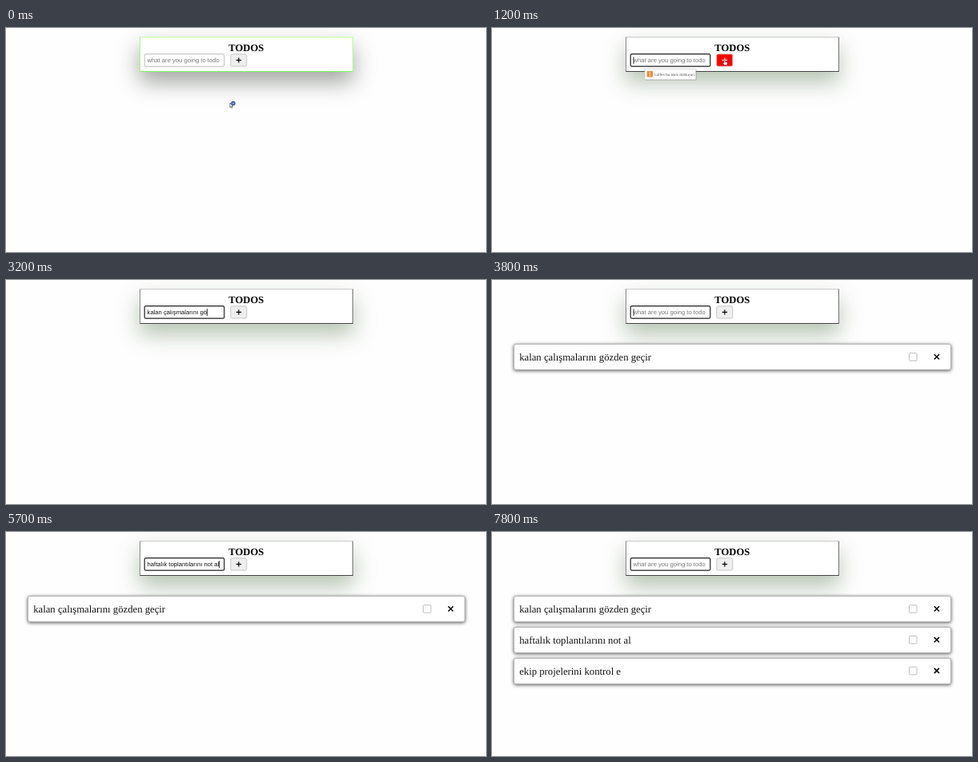
An HTML page for the animation above (8 s loop, 600x281 px).

```html
<!DOCTYPE html>
<html lang="tr">
<head>
<meta charset="utf-8">
<title>Todos</title>
<style>
html, body { margin: 0; width: 100%; height: 100%; overflow: hidden; background: #fefefe; }
.stage { position: absolute; left: 0; top: 0; width: 600px; height: 281px; overflow: hidden; }
svg { position: absolute; left: 0; top: 0; }
.panel, .item { position: absolute; box-sizing: border-box; background: #fff; }
.panel {
  left: 167px; top: 11px; width: 267px; height: 44px;
  border: 1px solid; animation: calm 8s linear infinite;
}
.item {
  left: 27px; width: 547px; height: 33px; border-radius: 3px;
  border: 1px solid #b4b4b4;
  box-shadow: 0 1px 4px rgba(0, 0, 0, .65);
}
text { white-space: pre; text-rendering: geometricPrecision; }
.title, .label { font-family: "Liberation Serif", "Times New Roman", serif; }
.title { font-size: 12.6px; font-weight: bold; }
.label { font-size: 12.72px; fill: #111; }
.field { font: 7.65px "Liberation Sans", Arial, sans-serif; }
.bubble text { font: 4.3px "Open Sans", "Noto Sans", sans-serif; }
.add rect { animation: hover 8s step-end infinite; }
.add path { animation: plus 8s step-end infinite; }
.bubble { animation: bubble 8s step-end infinite; }
.busy { animation: approach 8s infinite; }
.hand { animation: leave 8s step-end infinite; }

@keyframes calm {
  0%, 1.25% {
    border-color: #c4ffb4 #b4ffa0 #7dfb5c #a4fb8c;
    box-shadow: 0 13px 28px rgba(20, 32, 18, .4);
  }
  6.25%, 8.75% {
    border-color: #cdd2cb #9aa695 #52604c #707d6a;
    box-shadow: 0 13px 28px rgba(44, 80, 36, .38);
  }
  11.25%, 100% {
    border-color: #cbcbcb #777 #444 #888;
    box-shadow: 0 13px 28px rgba(50, 88, 42, .36);
  }
}
@keyframes hover {
  0% { fill: #efefef; stroke: #bcbcbc; }
  5% { fill: #f80000; stroke: #e8b0b0; }
  16.25%, 100% { fill: #efefef; stroke: #bcbcbc; }
}
@keyframes plus {
  0% { stroke: #000; }
  5% { stroke: #fff; }
  16.25%, 100% { stroke: #000; }
}
@keyframes bubble {
  0% { opacity: 0; }
  13.75% { opacity: 1; }
  18.75%, 100% { opacity: 0; }
}
@keyframes approach {
  0%, 1.24% { transform: translate(280px, 94px); opacity: 1; animation-timing-function: ease-in-out; }
  4.99% { transform: translate(288px, 46px); opacity: 1; }
  5%, 100% { transform: translate(288px, 46px); opacity: 0; }
}
@keyframes leave {
  0% { transform: translate(290px, 45px); opacity: 0; }
  5% { transform: translate(290px, 43px); opacity: 1; }
  6.25% { transform: translate(290px, 40px); opacity: 1; }
  16.25% { transform: translate(297px, 76px); opacity: 1; }
  17.5% { transform: translate(306px, 134px); opacity: 1; }
  18.75%, 100% { transform: translate(306px, 134px); opacity: 0; }
}
</style>
</head>
<body>
<div class="stage">
  <div class="panel"></div>
  <div id="items"></div>
  <svg width="600" height="281" viewBox="0 0 600 281">
    <defs>
      <clipPath id="inner"><rect x="175.5" y="33" width="95.5" height="15"/></clipPath>
    </defs>
    <text class="title" x="300.3" y="29.3" text-anchor="middle">TODOS</text>
    <rect id="box" x="173.2" y="32.7" width="99.6" height="15.5" rx="1.8" fill="#fff"/>
    <g clip-path="url(#inner)">
      <text id="hint" class="field" x="176.6" y="43.2" fill="#777">what are you going to todo</text>
      <text id="typed" class="field" y="43.2" fill="#111"></text>
      <rect id="caret" y="36.2" width=".8" height="8.8" fill="#000"/>
    </g>
    <g class="add">
      <rect x="280.8" y="32.8" width="20" height="15.2" rx="1.8" stroke-width=".8"/>
      <path d="M287.7 40.4h6.4M290.9 37.2v6.4" stroke-width="1.2"/>
    </g>
    <g id="rows"></g>
    <g class="bubble">
      <rect x="191.8" y="52" width="64" height="13.8" rx="1" fill="#000" opacity=".16"/>
      <rect x="191" y="51.2" width="63.8" height="13.6" rx="1" fill="#fff" stroke="#bbb" stroke-width=".6"/>
      <rect x="193.6" y="54" width="7.4" height="7.6" rx=".8" fill="#ef8a3c"/>
      <path d="M197.3 55.3v3.2M197.3 59.4v1" stroke="#fff" stroke-width="1"/>
      <text x="203.2" y="59.7" fill="#444">Lütfen bu alanı doldurun.</text>
    </g>
    <g class="busy">
      <path d="M0 0v5.6l1.3-1.1.9 1.9.9-.5-.9-1.8h1.7z" fill="#fff" stroke="#222" stroke-width=".6"/>
      <circle cx="4" cy=".6" r="2.1" fill="#8ca4dc" stroke="#35529e" stroke-width="1.3"/>
    </g>
    <g class="hand">
      <path d="M0 0q.8-.6 1.1.2v2.3l2.6.6q.7.3.6 1.1l-.6 2.4H.4L-1.6 4q.2-.9 1.6 0z" fill="#fff" stroke="#333" stroke-width=".5"/>
    </g>
  </svg>
</div>
<script>
const LOOP = 8000, STEP = 100, FOCUS = 1100;
const LEFT = 176.6, ROOM = 92;

// keys: [time, characters typed so far]
const tasks = [
  { text: "kalan çalışmalarını gözden geçir", done: 3800,
    keys: [[2000, 0], [2100, 2], [2800, 17], [2900, 17], [3200, 22], [3700, 32]] },
  { text: "haftalık toplantılarını not al", done: 5800,
    keys: [[4100, 0], [4600, 8], [5700, 30]] },
  { text: "ekip projelerini kontrol e", done: 7700,
    keys: [[5900, 0], [6400, 8], [7100, 18], [7200, 18], [7600, 26]] }
];

const $ = id => document.getElementById(id);
const box = $("box"), hint = $("hint"), typed = $("typed"), caret = $("caret");
const show = (el, on) => { el.style.visibility = on ? "visible" : "hidden"; };

tasks.forEach((task, i) => {
  const y = 80 + i * 38.8;
  task.card = document.createElement("div");
  task.card.className = "item";
  task.card.style.top = Math.round(y) + "px";
  $("items").append(task.card);

  task.row = document.createElementNS("http://www.w3.org/2000/svg", "g");
  task.row.setAttribute("transform", `translate(0 ${y})`);
  task.row.innerHTML = `<text class="label" x="34.2" y="21">${task.text}</text>
    <rect x="521.5" y="11.7" width="9.6" height="9.6" rx="1" fill="#fff" stroke="#b8b8b8" stroke-width=".9"/>
    <path d="M552.8 13.3l6.2 6.2m0-6.2l-6.2 6.2" stroke="#000" stroke-width="1.5"/>`;
  $("rows").append(task.row);
});

function countAt(keys, t) {
  if (t <= keys[0][0]) return 0;
  const next = keys.findIndex(key => t <= key[0]);
  if (next < 0) return keys[keys.length - 1][1];
  const [t0, n0] = keys[next - 1], [t1, n1] = keys[next];
  return Math.floor(n0 + (n1 - n0) * (t - t0) / (t1 - t0));
}

function draw(now) {
  const t = Math.floor(now % LOOP / STEP) * STEP;
  const focused = t >= FOCUS;
  const current = tasks.find(task => t < task.done);
  const value = current ? current.text.slice(0, countAt(current.keys, t)) : "";

  for (const task of tasks) {
    show(task.card, t >= task.done);
    show(task.row, t >= task.done);
  }
  box.setAttribute("stroke", focused ? "#222" : "#aaa");
  box.setAttribute("stroke-width", focused ? 1.2 : .8);

  typed.textContent = value;
  const width = value ? typed.getComputedTextLength() : 0;
  const x = LEFT - Math.max(0, width - ROOM);
  typed.setAttribute("x", x);
  caret.setAttribute("x", x + width);
  show(hint, !value);
  const blinkedOff = t >= 1600 && t < 1800;
  show(caret, focused && !blinkedOff && t < 7700);
}

function tick() {
  draw(performance.now());
  requestAnimationFrame(tick);
}
tick();
</script>
</body>
</html>
```
